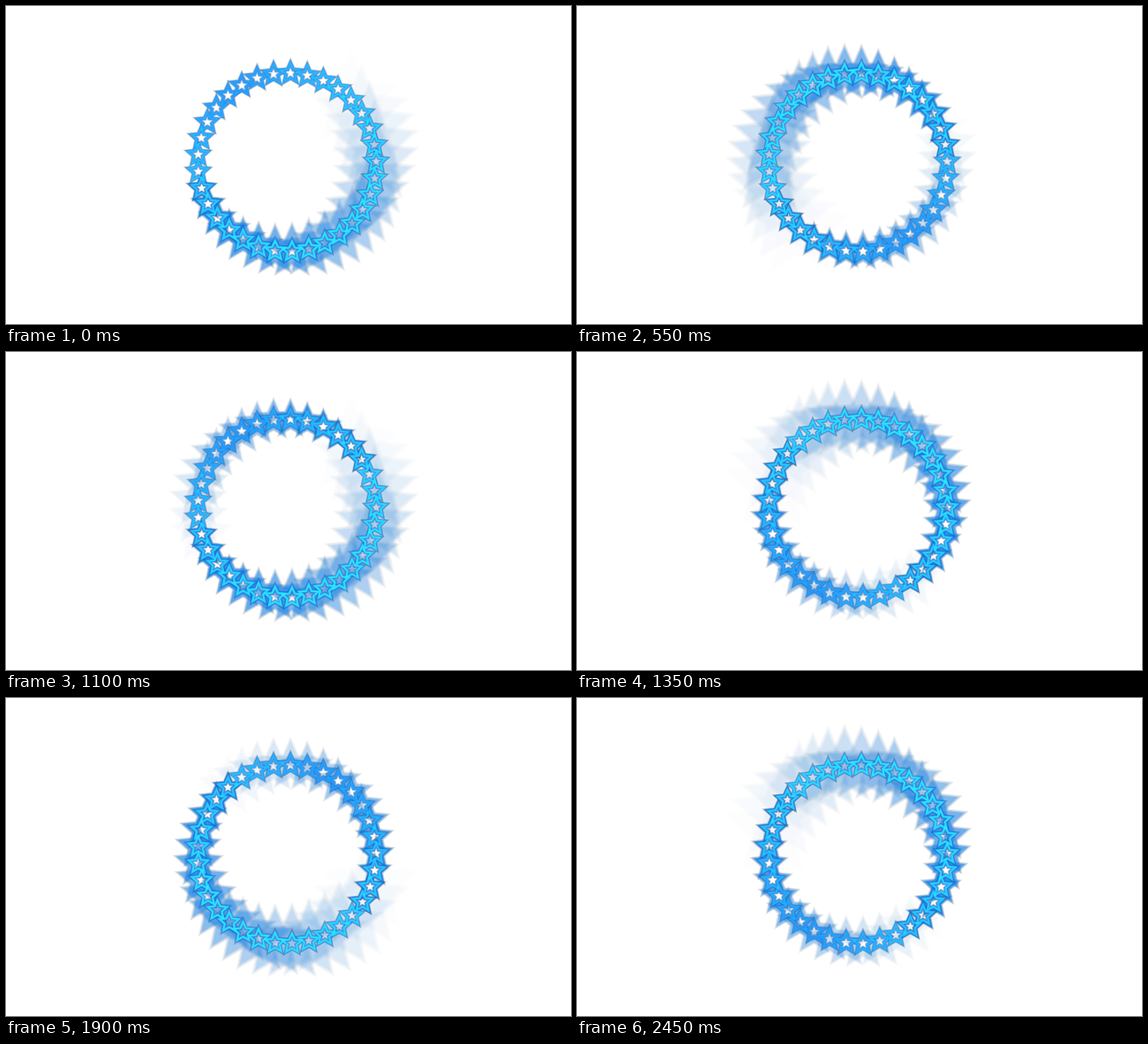
Animation of 640x360 px, one loop 2500 ms. Source, as an HTML page with a canvas:

```html
<!DOCTYPE html>
<html lang="en">
<head>
<meta charset="utf-8">
<title>Star ring</title>
<style>
  html, body { margin: 0; width: 100%; height: 100%; overflow: hidden; background: #fff; }
  canvas { display: block; }
</style>
</head>
<body>
<canvas id="stage" width="640" height="360"></canvas>
<script>
const ctx = document.getElementById('stage').getContext('2d');
const LOOP = 2500, STEP = 50;
const COUNT = 33, CX = 318.3, CY = 177, RING = 101, START = -0.5;
const TURN = 1100 / 3;          // ms per lap of the wave
const TAIL = -55;               // where the oldest echo sits at time 0
const RADIUS = 11.4, NOTCH = 0.47;

// Echo waves: lag behind the first tail, arc they cover, growth, first start
const WAVES = [
  { lag: 0, arc: 228, grow: 2.4, since: -Infinity },
  { lag: 205, arc: 185, grow: 1.15, since: 0 }
];

// Stroke layers from the outer haze to the core; falloff bends the fade
const HAZE = [
  { width: 5.6, color: '#123c62', alpha: 0.22, falloff: 1.2 },
  { width: 4.4, color: '#1a6fc0', alpha: 0.4, falloff: 1.4 },
  { width: 3.2, color: '#1e90ff', alpha: 0.9, falloff: 1.8 }
];

const wrap = deg => ((deg % 360) + 360) % 360;

const star = new Path2D();
for (let i = 0; i < 10; i++) {
  const a = i * Math.PI / 5, r = i % 2 ? RADIUS * NOTCH : RADIUS;
  star.lineTo(r * Math.sin(a), -r * Math.cos(a));
}
star.closePath();

const stars = Array.from({ length: COUNT }, (_, i) => {
  const deg = START + i * 360 / COUNT, a = deg * Math.PI / 180;
  return { deg, x: CX + RING * Math.cos(a), y: CY + RING * Math.sin(a) };
});

function stroke(s, scale, width, color, alpha) {
  ctx.setTransform(scale, 0, 0, scale, s.x, s.y);
  ctx.globalAlpha = alpha;
  ctx.lineWidth = width;
  ctx.strokeStyle = color;
  ctx.stroke(star);
}

function drawEchoes(wave, tail, t) {
  const echoes = [];
  for (const s of stars) {
    const u = wrap(s.deg - tail - wave.lag);
    if (u >= wave.arc) continue;
    const age = (wave.arc - u) / 360 * TURN;
    if (t - age < wave.since) continue;
    const fade = u / wave.arc;
    echoes.push({ s, scale: 1 + wave.grow * (1 - fade), fade });
  }
  for (const l of HAZE)
    for (const e of echoes)
      stroke(e.s, e.scale, l.width, l.color, l.alpha * e.fade ** l.falloff);
}

function drawRing(tail) {
  for (const l of HAZE)
    for (const s of stars) stroke(s, 1, l.width, l.color, l.alpha);
  for (const s of stars) {
    const u = (s.deg - tail - 110) * Math.PI / 180;
    const glow = Math.sqrt(0.5 + 0.5 * Math.cos(u));
    stroke(s, 1, 2.2, '#2ee8ff', 0.1 + 0.8 * glow);
  }
}

function draw(t) {
  const tail = TAIL + t / TURN * 360;
  ctx.setTransform(1, 0, 0, 1, 0, 0);
  ctx.globalAlpha = 1;
  ctx.fillStyle = '#fff';
  ctx.fillRect(0, 0, 640, 360);
  ctx.lineJoin = 'miter';
  for (const wave of WAVES) drawEchoes(wave, tail, t);
  drawRing(tail);
}

function tick() {
  const t = performance.now() % LOOP;
  draw(Math.floor(t / STEP) * STEP);
  requestAnimationFrame(tick);
}
tick();
</script>
</body>
</html>
```
